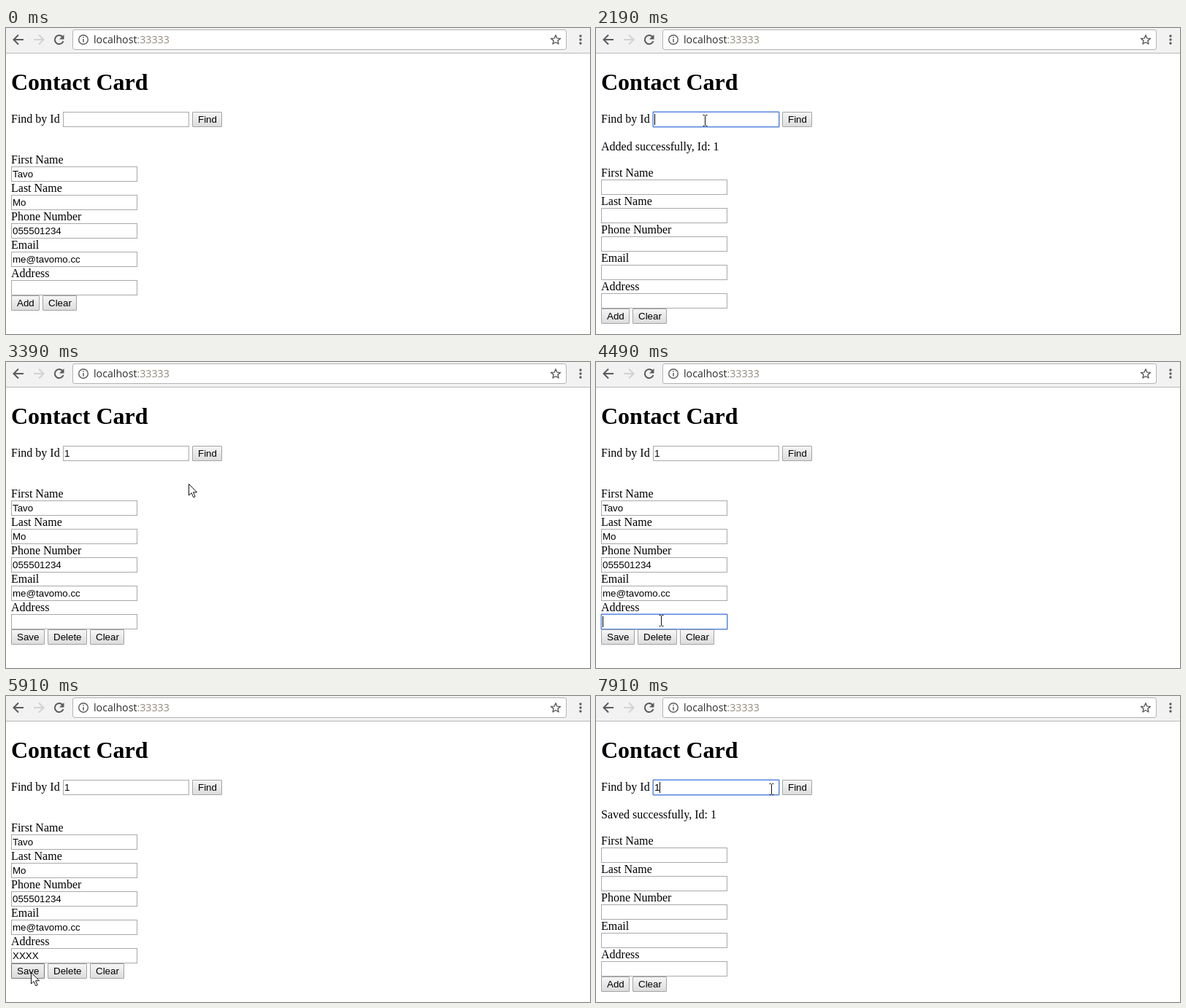
An HTML page for the animation above (8 s loop, 800 by 420 pixels).

```html
<!DOCTYPE html>
<html lang="en">
<head>
<meta charset="utf-8">
<title>Contact Card</title>
<style>
html, body { margin: 0; width: 100%; height: 100%; overflow: hidden; background: #fff; }
svg { display: block; width: 800px; height: 420px; }
.page { font: 16px "Liberation Serif", "Times New Roman", serif; }
.ui { font: 13.333px "Liberation Sans", Arial, sans-serif; }
h1, .title { font: bold 32px "Liberation Serif", "Times New Roman", serif; }
.url { font: 14.2px "Open Sans", sans-serif; }
</style>
</head>
<body>
<svg viewBox="0 0 800 420" xmlns="http://www.w3.org/2000/svg">
  <defs>
    <linearGradient id="face" x2="0" y2="1"><stop stop-color="#f6f6f6"/><stop offset="1" stop-color="#dcdcdc"/></linearGradient>
    <linearGradient id="lit" x2="0" y2="1"><stop stop-color="#f0f0f0"/><stop offset="1" stop-color="#dadada"/></linearGradient>
  </defs>
  <rect width="800" height="420" fill="#fff"/>
  <rect width="800" height="34" fill="#f2f2f2"/>
  <rect y="34" width="800" height="1" fill="#b8b8b8"/>
  <rect x="91.5" y="2.5" width="676" height="27" rx="2.5" fill="#fff" stroke="#b4b4b4"/>
  <g fill="none" stroke="#5a5a5a" stroke-width="2">
    <path d="M24 16H11M17 9.5L10.500 16l6.500 6.500"/>
    <path d="M38 16H51M45 9.500l6.500 6.500-6.500 6.500" stroke="#d2d2d2"/>
    <path d="M77.300 12A6 6 0 1 0 78.500 18"/>
    <circle cx="106" cy="16" r="6.300" stroke-width="1.400"/>
    <path d="M106 15v4.500M106 12v1.600" stroke-width="1.500"/>
    <path id="star" stroke-width="1.400" stroke-linejoin="round"/>
  </g>
  <path d="M79.500 9v6.500H73z" fill="#5a5a5a"/>
  <g fill="#5a5a5a"><circle cx="787" cy="11" r="1.700"/><circle cx="787" cy="16" r="1.700"/><circle cx="787" cy="21" r="1.700"/></g>
  <text class="url" x="120" y="21" fill="#2c2c2c">localhost<tspan fill="#93897d">:33333</tspan></text>
  <text class="title" x="7" y="85">Contact Card</text>
  <text class="page" x="7" y="130">Find by Id</text>
  <g id="form"></g>
  <g id="mouse"></g>
</svg>
<script>
const LOOP = 8000;
const labels = ["First Name", "Last Name", "Phone Number", "Email", "Address"];
const person = ["Tavo", "Mo", "055501234", "me@tavomo.cc"];
const $ = id => document.getElementById(id);
const within = (t, a, b) => t >= a && t < b;

$("star").setAttribute("d", "M" + Array.from({ length: 10 }, (_, i) => {
  const a = -Math.PI / 2 + i * Math.PI / 5, r = i % 2 ? 3 : 6.8;
  return (753 + r * Math.cos(a)).toFixed(1) + " " + (16.5 + r * Math.sin(a)).toFixed(1);
}).join("L") + "Z");

// Pointer runs: start, end, number of positions, from, to
const runs = [
  [100, 100, 1, 32, 371, 32, 371],
  [980, 980, 1, 31, 368, 31, 368],
  [1410, 2080, 7, 38, 357, 150, 127],
  [2400, 2850, 5, 175, 127, 278, 124],
  [3170, 3840, 7, 262, 150, 99, 373],
  [3950, 3950, 1, 90, 355, 90, 355],
  [5040, 5040, 1, 88, 375, 88, 375],
  [5260, 5800, 6, 82, 376, 34, 379],
  [6360, 6800, 5, 60, 350, 241, 153],
  [6910, 7020, 2, 252, 140, 262, 128],
  [7240, 7350, 2, 253, 128, 234, 128],
  [7790, 7790, 1, 241, 128, 241, 128]
];

function pointer(t) {
  const run = runs.filter(r => t >= r[0]).pop();
  if (!run) return null;
  const [start, end, n, x0, y0, x1, y1] = run;
  if (n < 2) return { x: x1, y: y1 };
  const step = Math.min(n - 1, Math.floor((t - start) * (n - 1) / (end - start) + 0.001));
  const k = step / (n - 1), e = k * k * (3 - 2 * k);
  return { x: Math.round(x0 + (x1 - x0) * e), y: Math.round(y0 + (y1 - y0) * e) };
}

const text = (x, y, s, cls) => `<text class="${cls}" x="${x}" y="${y}">${s}</text>`;

function field(x, y, value, focus, caret) {
  const ring = focus
    ? `<rect x="${x - 0.5}" y="${y - 0.5}" width="174" height="22" rx="1.5" fill="none" stroke="#a5c0f0"/>` : "";
  const bar = caret
    ? `<rect x="${x + 2 + Math.round(value.length * (value[0] === "X" ? 8.9 : 7.4))}" y="${y + 3}" width="1" height="15"/>` : "";
  return ring + `<rect x="${x + 0.5}" y="${y + 0.5}" width="172" height="20" fill="#fff" stroke="${focus ? "#5b8ade" : "#a9a9a9"}"/>`
    + text(x + 2, y + 15, value, "ui") + bar;
}

function button(x, y, w, s, hot) {
  return `<rect x="${x + 0.5}" y="${y + 0.5}" width="${w - 1}" height="20" rx=".5" fill="url(#${hot ? "lit" : "face"})" stroke="${hot ? "#777" : "#a3a3a3"}"/>`
    + text(x + 8, y + 15, s, "ui");
}

function arrow({ x, y }) {
  return `<path transform="translate(${x + 0.5} ${y + 0.5})" d="M0 0V15.500L3.600 12.200L6.300 18.300L8.700 17.200L6 11.300H11Z" fill="#fff" stroke="#111" stroke-linejoin="round"/>`;
}

function beam({ x, y }) {
  return `<path transform="translate(${x - 0.5} ${y - 0.5})" d="M-3 -7H-1L0 -6L1 -7H3M0 -6V7M-3 8H-1L0 7L1 8H3" fill="none" stroke="#111"/>`;
}

function draw(t) {
  const filled = t < 640 || within(t, 3170, 6030);
  const editing = within(t, 3060, 6030);
  const message = within(t, 640, 3060) ? "Added" : t >= 6030 ? "Saved" : "";
  const shift = message ? 18 : 0;
  const p = pointer(t);
  const inside = (x, y, w) => p && p.x >= x && p.x < x + w && p.y >= y && p.y < y + 21;

  const id = within(t, 2290, 6030) || t >= 7910 ? "1" : "";
  const idFocus = within(t, 2190, 2960) || t >= 7460;
  const idCaret = within(t, 2190, 2730) || within(t, 7570, 7790) || t >= 7910;
  const typed = [4600, 4700, 4820, 4930].filter(k => t >= k).length;
  const address = editing ? "X".repeat(typed) : "";
  const addrFocus = within(t, 4060, 5910);
  const addrCaret = within(t, 4490, 5480);

  let out = field(78, 115, id, idFocus, idCaret) + button(255, 115, 41, "Find", inside(255, 115, 41));
  if (message) out += text(7, 168, message + " successfully, Id: 1", "page");
  labels.forEach((label, i) => {
    const y = 190 + 39 * i + shift, last = i === 4;
    const value = last ? address : filled ? person[i] : "";
    out += text(7, y - 4, label, "page") + field(7, y, value, last && addrFocus, last && addrCaret);
  });

  const row = 367 + shift;
  const buttons = editing
    ? [[7, 46, "Save"], [57, 54, "Delete"], [115, 47, "Clear"]]
    : [[7, 39, "Add"], [50, 47, "Clear"]];
  buttons.forEach(([x, w, s]) => {
    const hot = inside(x, row, w) || (s === "Add" && within(t, 640, 980));
    out += button(x, row, w, s, hot);
  });

  // The pointer shape lags behind when the form shifts under it.
  const stale = within(t, 640, 980) || within(t, 6030, 6360);
  const overField = inside(78, 115, 173) || labels.some((_, i) => inside(7, 190 + 39 * i + shift, 173));
  $("form").innerHTML = out;
  $("mouse").innerHTML = !p ? "" : overField && !stale ? beam(p) : arrow(p);
}

const begin = performance.now();
function tick(now) {
  draw(Math.max(0, now - begin) % LOOP);
  requestAnimationFrame(tick);
}
draw(0);
requestAnimationFrame(tick);
</script>
</body>
</html>
```
